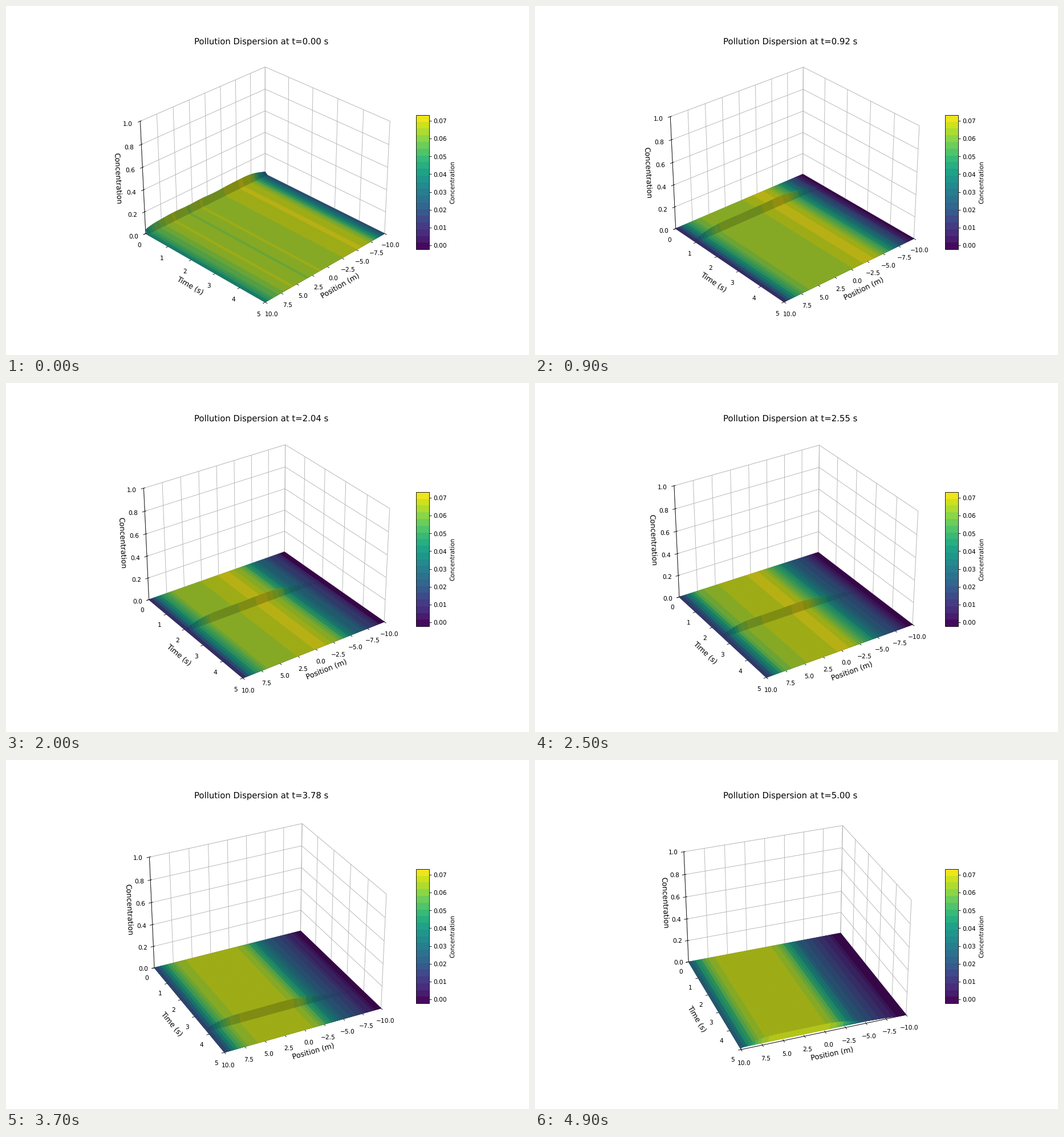
These frames come from a looping animation (917 by 611 pixels, 5000 ms). A matplotlib script:

```python
import math

import numpy as np
import matplotlib as mpl
import matplotlib.pyplot as plt
from matplotlib.animation import FuncAnimation
from matplotlib.cm import ScalarMappable
from matplotlib.colors import ListedColormap, Normalize

FRAMES = 50
DURATION = 5.0
STEP = DURATION / (FRAMES - 1)
DPI = 917 / 12
BANDS = 20

mpl.rcParams["text.hinting"] = "none"

positions = np.linspace(-10, 10, 50)
cmap = ListedColormap(mpl.colormaps["viridis"]((np.arange(BANDS) + 0.5) / BANDS))
norm = Normalize(-0.00225, 0.0732)
erf = np.vectorize(math.erf)


def wall(distance):
    """Fade to zero at an absorbing end of the channel."""
    return erf(np.maximum(distance, 0) / 2.6)


def concentration(t):
    x = positions
    front = -3 - 6.5 * math.exp(-t / 1.5)
    residue = 0.03 - 0.0028 * t

    crest = (0.0085 - 0.0014 * t) * np.exp(-((x - front - 3.5) / 2) ** 2)
    ripple = 0.002 * math.exp(-t / 0.6) * np.cos(2 * np.pi * (x - 1) / 4.5)
    plateau = 0.0638 + 0.0008 * t + crest + ripple

    passed = 1 / (1 + np.exp(-(x - front) / 0.85))
    profile = residue + (plateau - residue) * passed

    start = 1.3 * math.exp(-t / 0.2)
    low_end = wall(10 + x + start - 0.15 * t)
    high_end = wall(10 - x + start + 0.45 * (t / DURATION) ** 3)
    return profile * low_end * high_end


fig = plt.figure(figsize=((917 + 1e-6) / DPI, (611 + 1e-6) / DPI), dpi=DPI)
ax = fig.add_subplot(111, projection="3d")
ax.set(xlim=(-10, 10), ylim=(0, DURATION), zlim=(0, 1),
       xticks=np.arange(-10, 10.1, 2.5), yticks=range(6))
ax.set_xlabel("Position (m)", fontsize=12)
ax.set_ylabel("Time (s)", fontsize=12)
ax.set_zlabel("Concentration", fontsize=12)
for axis in (ax.xaxis, ax.yaxis, ax.zaxis):
    axis.pane.fill = False

bar = fig.colorbar(ScalarMappable(norm, cmap), ax=ax, shrink=0.5, aspect=10,
                   ticks=np.arange(8) / 100, format="%.2f")
bar.set_label("Concentration")

surface = None


def update(frame):
    global surface
    if surface is not None:
        surface.remove()
    t = frame * STEP
    profile = concentration(t)

    # The sheet is flat except for a one-step ridge at the current time.
    last = FRAMES - 1
    rows = np.unique(np.clip([0, frame - 1, frame, frame + 1, last], 0, last))
    x, y = np.meshgrid(positions, rows * STEP)
    z = np.outer(rows == frame, profile)
    colors = np.tile(cmap(norm(profile)), (len(rows), 1, 1))
    surface = ax.plot_surface(x, y, z, facecolors=colors, rstride=1, cstride=1)

    ax.view_init(elev=30, azim=45 + 0.5 * frame)
    ax.set_title(f"Pollution Dispersion at t={t:.2f} s", fontsize=14)
    return []


anim = FuncAnimation(fig, update, frames=FRAMES, interval=100,
                     init_func=lambda: [], repeat=True, repeat_delay=0)
plt.show()
```
